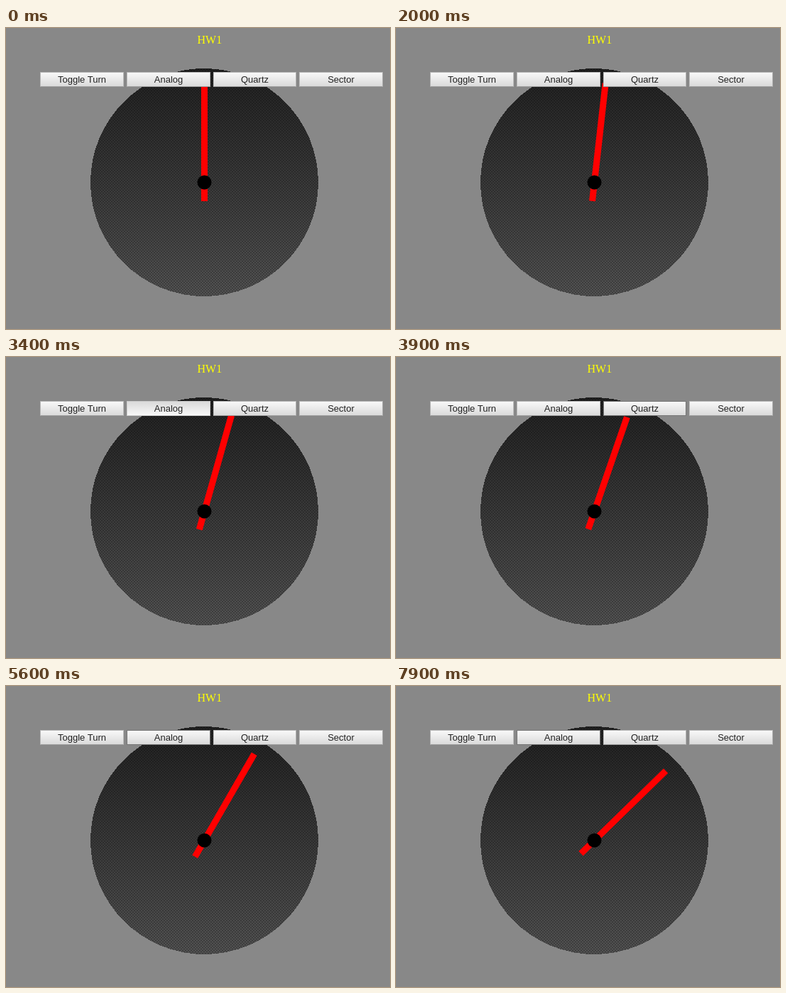
An HTML page for the animation above (8 s loop, 541x424 px).

```html
<!DOCTYPE html>
<html lang="en">
<head>
<meta charset="utf-8">
<title>HW1</title>
<style>
  html, body { margin: 0; width: 100%; height: 100%; overflow: hidden; background: #888; }
  svg { position: absolute; left: 0; top: 0; }
  .title { font: 16px "Liberation Serif", serif; fill: #ff0; }
  .button {
    position: absolute; top: 62px; height: 21px; box-sizing: border-box;
    border: 1px solid #bbb; border-bottom-color: #a0a0a0;
    background: linear-gradient(#f8f8f8, #dadada);
    font: 13px/19px "Liberation Sans", sans-serif; color: #222; text-align: center;
  }
  .hover { border-color: #777; }
  .active { border-color: #ccc; background: linear-gradient(#dadada, #f8f8f8); }
</style>
</head>
<body>
<svg width="541" height="424">
  <defs>
    <linearGradient id="shade" x2="0" y2="1">
      <stop stop-color="#202020"/>
      <stop offset="1" stop-color="#505050"/>
    </linearGradient>
    <pattern id="mesh" width="4" height="4" patternUnits="userSpaceOnUse">
      <path d="M0 0h2v1h-2zM2 2h2v1h-2z" fill="#000" fill-opacity=".35" shape-rendering="crispEdges"/>
    </pattern>
  </defs>
  <text class="title" x="269.5" y="22">HW1</text>
  <g shape-rendering="crispEdges">
    <circle cx="279.5" cy="217.5" r="160.5" fill="url(#shade)"/>
    <circle cx="279.5" cy="217.5" r="160.5" fill="url(#mesh)"/>
  </g>
  <g transform="translate(279.5 217.5)">
    <rect id="hand" x="-4.5" y="-140.5" width="9" height="167" fill="#f00"/>
    <circle r="10"/>
  </g>
</svg>
<script>
const LOOP = 8000, STEP = 100;
const START = 1040, TICK = 900, TICK_ANGLE = 6;
const QUARTZ_FROM = 4600, ANALOG_FROM = 7400;
const [TOGGLE, ANALOG, QUARTZ, SECTOR] = [0, 1, 2, 3];

// Pointer history: time, button under the pointer, its state
const pointer = [
  [0, -1], [200, SECTOR, "hover"], [300, -1], [400, QUARTZ, "hover"],
  [500, ANALOG, "hover"], [600, -1], [700, TOGGLE, "hover"],
  [1100, TOGGLE, "active"], [1200, TOGGLE, "hover"], [1500, -1],
  [3000, ANALOG, "hover"], [3400, ANALOG, "active"], [3500, ANALOG, "hover"],
  [3700, QUARTZ, "hover"], [4500, QUARTZ, "active"], [4700, QUARTZ, "hover"],
  [4900, -1], [5000, ANALOG, "hover"],
  [7400, ANALOG, "active"], [7500, ANALOG, "hover"]
];

const buttons = ["Toggle Turn", "Analog", "Quartz", "Sector"].map((label, i) => {
  const button = document.createElement("div");
  const left = 48.2 + 121.7 * i, right = left + 117.7;
  button.textContent = label;
  button.style.left = Math.round(left) + "px";
  button.style.width = Math.round(right) - Math.round(left) + "px";
  document.body.append(button);
  return button;
});
const hand = document.getElementById("hand");

function handAngle(t) {
  if (t >= QUARTZ_FROM && t < ANALOG_FROM) {
    return 24 + TICK_ANGLE * Math.max(0, Math.floor((t - 4700) / TICK));
  }
  return Math.max(0, (t - START) / TICK * TICK_ANGLE);
}

function draw(now) {
  const t = Math.floor(now % LOOP / STEP) * STEP;
  const [, target, state] = pointer.findLast(([from]) => from <= t);
  buttons.forEach((button, i) => {
    button.className = i === target ? "button " + state : "button";
  });
  hand.setAttribute("transform", `rotate(${handAngle(t)})`);
}

const begin = performance.now();
function loop() {
  draw(performance.now() - begin);
  requestAnimationFrame(loop);
}
loop();
</script>
</body>
</html>
```
